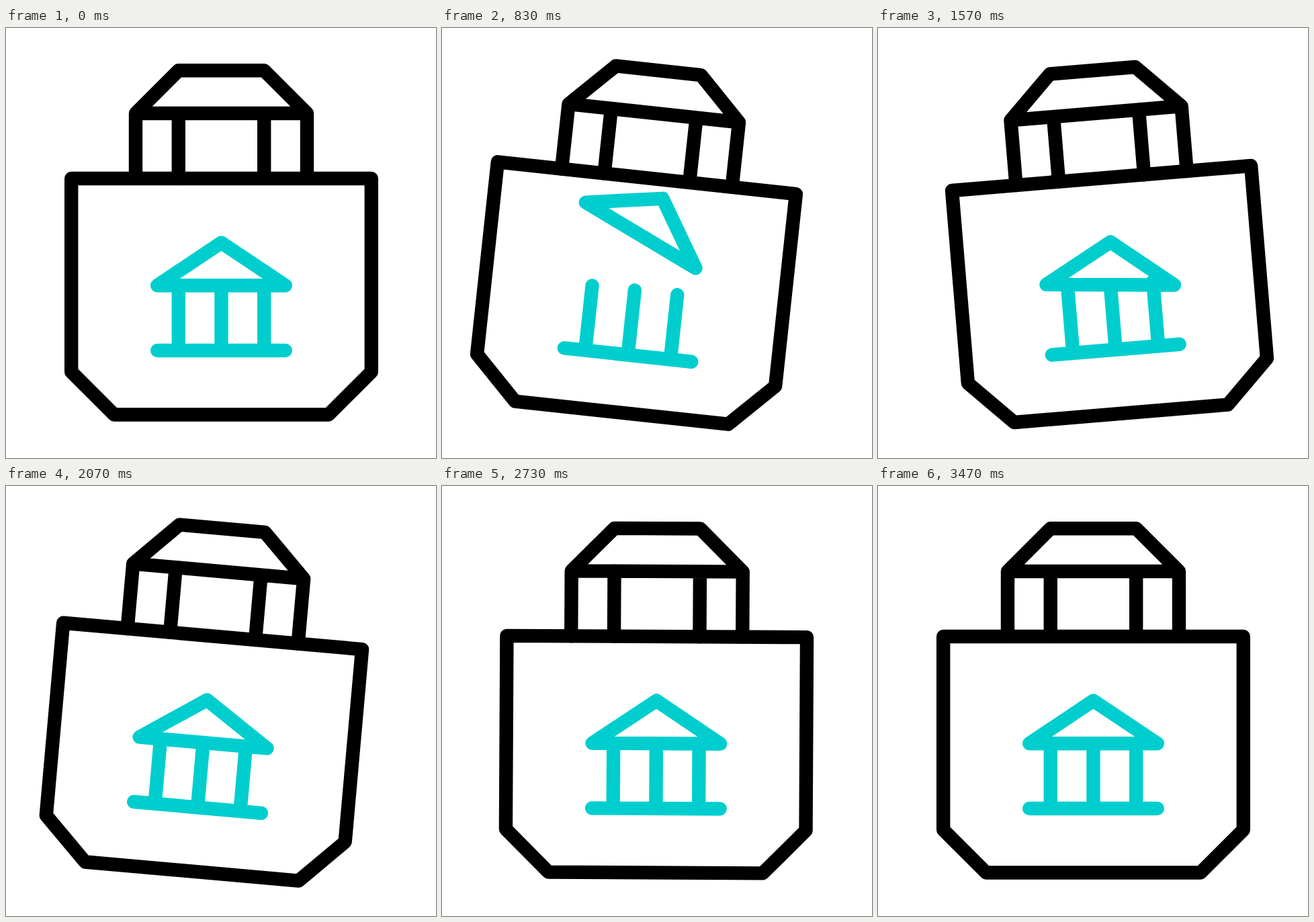
An HTML page that plays this animation: 640 by 640 pixels, repeating every 3.87 s.

```html
<!DOCTYPE html>
<html lang="en">
<head>
<meta charset="utf-8">
<title>Swinging bag</title>
<style>
  html, body { margin: 0; width: 100%; height: 100%; overflow: hidden; background: #fff; }
  svg { display: block; width: 100%; height: 100%; }
  path { fill: none; stroke: #000; stroke-width: 20.4; stroke-linecap: round; stroke-linejoin: round; }
  .bank path { stroke: #00cece; }
</style>
</head>
<body>
<svg viewBox="0 0 640 640">
  <g id="bag">
    <path d="M97.2 224H543.8V511.7L480 575.5H161L97.2 511.7Z"/>
    <path d="M193 224V127L256.8 63.2H384.2L448 127V224M193 127H448M256.8 127V224M384.2 127V224"/>
    <g class="bank">
      <path id="base"/>
      <path id="roof" d="M225.2 383.2H415.8L320.5 319.5Z"/>
    </g>
  </g>
</svg>
<script>
const LOOP = 3870, STEP = 100 / 3, LAST = 104;
const [bag, base, roof] = ['bag', 'base', 'roof'].map(id => document.getElementById(id));

// Each track is a list of [step, value] pairs, eased between neighbours.
const swing = [[0, 0], [14, -12], [29, 10], [44, -6], [59, 6], [74, -3], [89, 3], [104, 0]];
const sink = [[0, 0], [14, 23.3], [33, 0]];
const lift = [[0, 0], [14, 33], [29, -96], [44, 0]];
const tilt = [[14, 0], [29, 30], [44, 5.5], [59, 0]];

function at(track, step) {
  const i = track.findIndex(key => key[0] > step);
  if (i < 0) return track[track.length - 1][1];
  if (i === 0) return track[0][1];
  const [s0, v0] = track[i - 1], [s1, v1] = track[i];
  const p = (step - s0) / (s1 - s0);
  return v0 + (v1 - v0) * p * p * (3 - 2 * p);
}

function draw(ms) {
  const step = Math.min(LAST, Math.floor((ms % LOOP + 3.5) / STEP));
  const floorY = at(sink, step), roofY = at(lift, step);
  const top = 383.2 + Math.max(floorY, roofY), bottom = 480 + floorY;
  const columns = [256.8, 320.5, 384.2].map(x => `M${x} ${top}V${bottom}`).join('');

  bag.setAttribute('transform', `rotate(${at(swing, step)} 320.5 78)`);
  base.setAttribute('d', `M225.2 ${bottom}H415.8${columns}`);
  roof.setAttribute('transform', `translate(0 ${roofY}) rotate(${at(tilt, step)} 320.5 383.2)`);
}

const start = performance.now();
function tick() {
  draw(performance.now() - start);
  requestAnimationFrame(tick);
}
tick();
</script>
</body>
</html>
```
